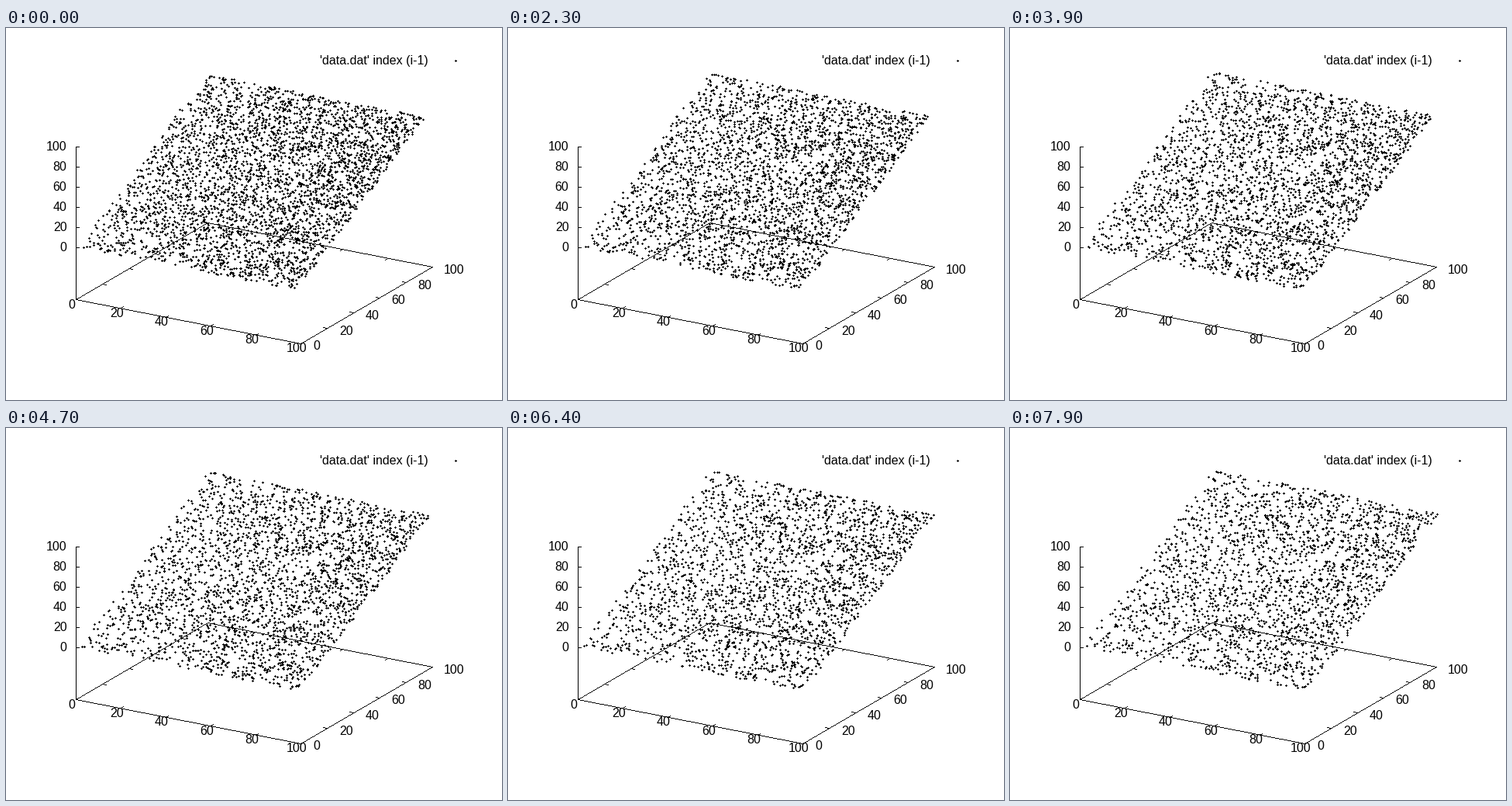
Animation of 640x480 px, one loop 8 s. Source, as a matplotlib script:

```python
import numpy as np
import matplotlib.pyplot as plt
from matplotlib.animation import FuncAnimation

W, H = 640, 480
FRAMES, STEP_MS = 80, 100
START_COUNT = 3700
ORIGIN = np.array([90, 350])
X_AXIS = np.array([290, 57])
Y_AXIS = np.array([170, -99])
Z_BASE, Z_RISE = -67, -130

plt.rcParams["font.family"] = "Liberation Sans"
fig = plt.figure(figsize=(8, 6), dpi=80, facecolor="white")
ax = fig.add_axes([0, 0, 1, 1])
ax.axis("off")


def line(img, start, end):
    """Draw a hard-edged line one pixel wide."""
    start, end = np.rint(start), np.rint(end)
    count = int(np.abs(end - start).max()) + 1
    x, y = np.rint(np.linspace(start, end, count)).astype(int).T
    img[y, x] = 0


def stamp(img, px, py):
    """Draw small plus signs centred on the given pixels."""
    for dx, dy in ((0, 0), (1, 0), (-1, 0), (0, 1), (0, -1)):
        img[py + dy, px + dx] = 0


def label(x, y, text, ha):
    ax.text(x, y + 5.4, text, ha=ha, va="baseline", fontsize=14.4, color="black")


def floor(x, y):
    return ORIGIN + x * X_AXIS + y * Y_AXIS


def make_axes():
    img = np.ones((H, W))
    corners = [floor(0, 0), floor(1, 0), floor(1, 1), floor(0, 1)]
    for a, b in zip(corners, corners[1:] + corners[:1]):
        line(img, a, b)
    line(img, corners[0], (90, 153))
    for k in range(6):
        t = k / 5
        z = 283 + Z_RISE * t
        line(img, (90, z), (94, z))
        line(img, floor(t, 0), floor(t, 0.02))
        line(img, floor(t, 1), floor(t, 0.98))
        line(img, floor(0, t), floor(0.016, t))
        line(img, floor(1, t), floor(0.984, t))
    stamp(img, 580, 42)
    return img


def add_labels():
    for k in range(6):
        text = str(20 * k)
        label(78.4, 283 + Z_RISE * k / 5, text, "right")
        label(85.2 + 57.9 * k, 356.7 + 11.2 * k, text, "center")
        label(396.5 + 33.6 * k, 410 - 19.7 * k, text, "left")
    label(544.7, 41.4, "'data.dat' index (i-1)", "right")


def make_walks():
    """Slow random walks on a unit square that widens slightly."""
    rng = np.random.default_rng(12)
    start = rng.random((START_COUNT, 2)) ** (0.82, 0.96)
    steps = rng.normal(0, 0.0015, (FRAMES, START_COUNT, 2))
    steps[0] = 0
    pos = np.abs(start + np.cumsum(steps, axis=0))
    pos = 1 - np.abs(1 - pos)
    span = np.linspace(0.975, 1.0, FRAMES)[:, None, None]
    return 0.005 + pos * span


def render(i):
    alive = int(START_COUNT / (1 + 0.6 * i / FRAMES))
    x, y = walks[i, :alive].T
    px = ORIGIN[0] + x * X_AXIS[0] + y * Y_AXIS[0]
    py = ORIGIN[1] + Z_BASE + x * X_AXIS[1] + y * (Y_AXIS[1] + Z_RISE)
    img = axes_img.copy()
    stamp(img, np.rint(px).astype(int), np.rint(py).astype(int))
    return img


def update(i):
    canvas.set_data(render(i))
    return (canvas,)


walks = make_walks()
axes_img = make_axes()
canvas = ax.imshow(render(0), cmap="gray", vmin=0, vmax=1, aspect="auto",
                   extent=(0, W, H, 0), interpolation="nearest", zorder=0)
add_labels()
ax.set_xlim(0, W)
ax.set_ylim(H, 0)

anim = FuncAnimation(fig, update, frames=FRAMES, interval=STEP_MS,
                     repeat=True, repeat_delay=0, blit=False)
plt.show()
```
